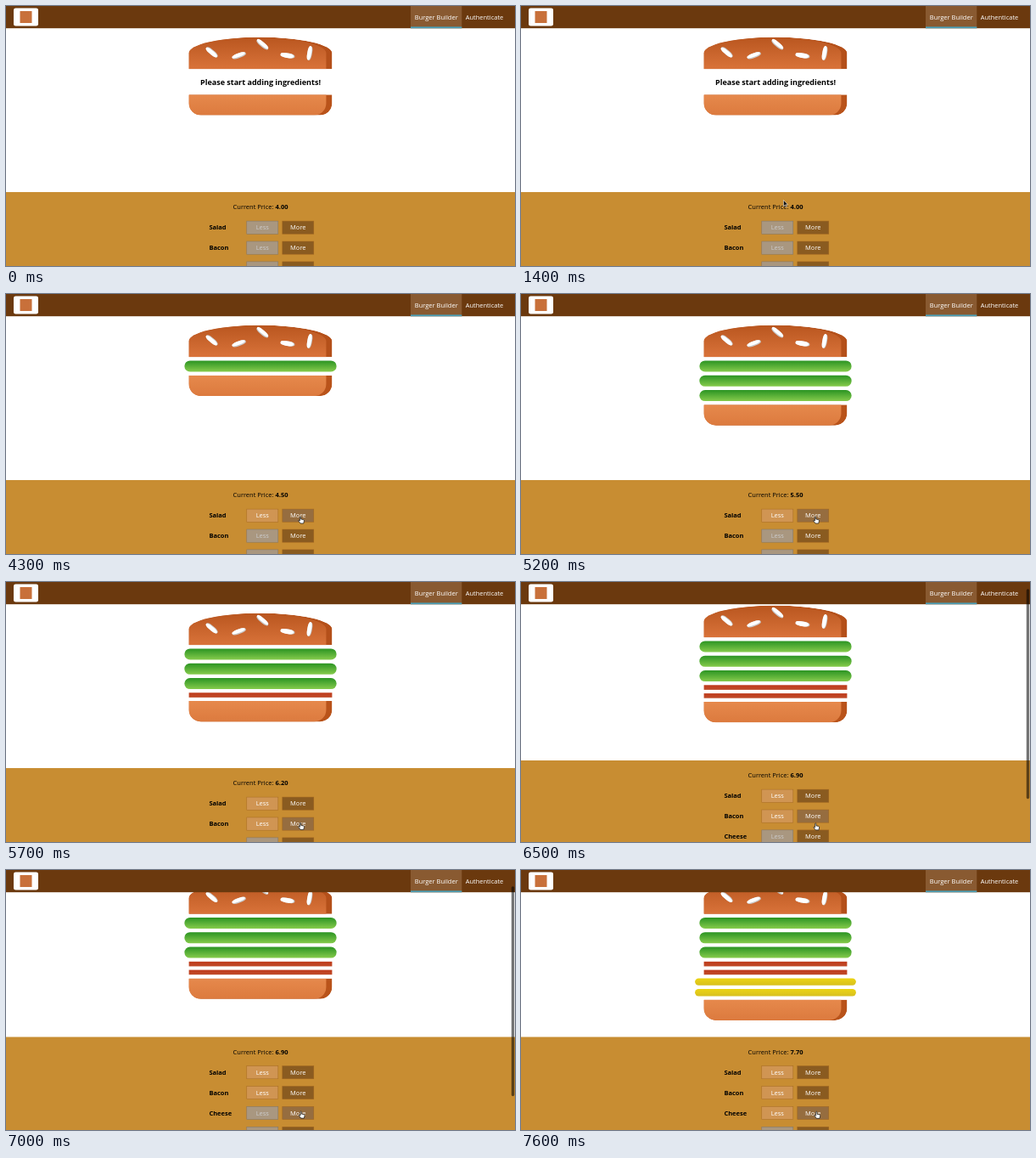
Animation, 600 px wide and 306 px high, one loop 8 s. Source, as an HTML page:

```html
<!DOCTYPE html>
<html lang="en">
<head>
<meta charset="utf-8">
<title>Burger Builder</title>
<style>
  html, body { margin: 0; width: 100%; height: 100%; overflow: hidden; background: #fff; }
  svg { display: block; width: 100%; height: 100%; }
  text { font: 7.5px "Open Sans", "Noto Sans", sans-serif; fill: #000; white-space: pre; }
  .bold { font-weight: 700; }
  .mid { text-anchor: middle; }
  .light { fill: #fff; }
</style>
</head>
<body>
<svg id="stage" viewBox="0 0 600 306" preserveAspectRatio="none">
  <defs>
    <linearGradient id="topFill" x2="0" y2="1"><stop stop-color="#b9561f"/><stop offset="1" stop-color="#d9733a"/></linearGradient>
    <linearGradient id="baseFill" x2="0" y2="1"><stop stop-color="#e6894c"/><stop offset="1" stop-color="#dc7a3e"/></linearGradient>
    <linearGradient id="saladFill" x2="0" y2="1"><stop stop-color="#2b9423"/><stop offset="1" stop-color="#86cb4c"/></linearGradient>
    <linearGradient id="baconFill" x2="0" y2="1"><stop stop-color="#bf3a1a"/><stop offset="1" stop-color="#c04c2a"/></linearGradient>
    <linearGradient id="cheeseFill" x2="0" y2="1"><stop stop-color="#ecd412"/><stop offset="1" stop-color="#d8c020"/></linearGradient>
    <path id="topShape" d="M215.6 74.2V55.45A84.4 18.75 0 0 1 384.4 55.45V74.2Z"/>
    <path id="baseShape" d="M215.6 0H384.4V10.3A14.1 14.1 0 0 1 370.3 24.4H229.7A14.1 14.1 0 0 1 215.6 10.3Z"/>
    <clipPath id="topClip"><use href="#topShape"/></clipPath>
    <clipPath id="baseClip"><use href="#baseShape"/></clipPath>
  </defs>

  <rect width="600" height="306" fill="#fff"/>

  <g id="page">
    <g clip-path="url(#topClip)">
      <use href="#topShape" fill="#b4501a"/>
      <use href="#topShape" fill="url(#topFill)" x="-7"/>
    </g>
    <g id="seeds"></g>
    <text id="hint" class="bold mid" x="300" y="92.8" style="font-size:9px">Please start adding ingredients!</text>
    <g id="layers"></g>
    <g id="base">
      <g clip-path="url(#baseClip)">
        <use href="#baseShape" fill="#b9531a"/>
        <use href="#baseShape" fill="url(#baseFill)" x="-7"/>
      </g>
    </g>
    <rect y="219" width="600" height="170" fill="#c88d32"/>
    <text class="mid" x="300" y="239.2">Current Price: <tspan id="price" class="bold">4.00</tspan></text>
    <g id="rows"></g>
  </g>

  <rect width="600" height="26.2" fill="#6b390e"/>
  <rect x="9" y="2.4" width="29" height="21.2" rx="2.4" fill="#fff"/>
  <rect x="16.5" y="6" width="14" height="14" fill="#c8703a"/>
  <rect x="477" width="60.3" height="26.2" fill="#895a31"/>
  <rect x="477" y="24.4" width="60.3" height="1.8" fill="#4a9fb8"/>
  <text class="light" x="481.8" y="15.7">Burger Builder</text>
  <text class="light" x="541.7" y="15.7">Authenticate</text>

  <rect id="thumb" x="595.8" width="3.4" height="247" rx="1.7" fill="#000"/>

  <g id="cursor">
    <g id="arrow">
      <path d="M0 0V7.2L1.7 5.6L2.8 8.1L3.9 7.6L2.8 5.2H5Z" fill="#111" stroke="#fff" stroke-width=".5"/>
      <g id="ban" transform="translate(4.3 9)">
        <circle r="3.2" fill="#fff" stroke="#fff" stroke-width="2"/>
        <path d="M-2.1 -2.1L2.1 2.1M3 0A3 3 0 1 1 -3 0A3 3 0 1 1 3 0Z" fill="none" stroke="#333" stroke-width="1"/>
      </g>
    </g>
    <path id="hand" d="M-.6 .5Q0 -.5 .7 .5V3L3.6 3.6Q4.6 3.9 4.4 5L3.8 8H0L-2.2 5Q-2.4 3.9 -1.4 4.2L-.6 5Z" fill="#fff" stroke="#111" stroke-width=".7" stroke-linejoin="round"/>
  </g>
</svg>

<script>
const LOOP = 8000, STEP = 100, GAP = 4.2, STACK_TOP = 78.4;
const kinds = {
  salad:  { label: 'Salad',  cost: .5, w: 179.3, h: 13.1, r: 6.55 },
  bacon:  { label: 'Bacon',  cost: .7, w: 168.8, h: 5.6,  r: 0 },
  cheese: { label: 'Cheese', cost: .4, w: 189.8, h: 8.4,  r: 4.2 },
  meat:   { label: 'Meat',   cost: 1.3 }
};
const clicks = [
  [3900, 'salad'], [4800, 'salad'], [5200, 'salad'],
  [5700, 'bacon'], [6100, 'bacon'],
  [7200, 'cheese'], [7600, 'cheese']
];
const hovers = [[3600, 'salad'], [5400, 'bacon'], [7000, 'cheese']];

// Tracks of [time, value, ...], linear between keys
const scrollKeys = [[6300, 0], [6400, 3], [6500, 9], [6600, 15], [6700, 19.5], [6800, 21.2], [7000, 22.5]];
const thumbKeys = [[6300, 0], [6400, .55], [7300, .55], [7600, 0]];
const cursorKeys = [
  [500, 372, 306], [800, 340, 262], [1100, 314, 224], [1300, 309.5, 228], [1400, 309.5, 228.5],
  [1600, 311, 244], [1900, 311, 244], [2400, 301, 257], [2800, 297.3, 261.3],
  [3200, 297.3, 261.3], [3700, 347, 262], [5200, 347, 262], [5500, 347, 283.3],
  [6700, 347.3, 284], [7600, 348.3, 284.3]
];

const $ = id => document.getElementById(id);

function add(parent, tag, attrs, text = '') {
  const el = document.createElementNS('http://www.w3.org/2000/svg', tag);
  for (const k in attrs) el.setAttribute(k, attrs[k]);
  el.textContent = text;
  return parent.appendChild(el);
}

function sample(keys, t) {
  if (t <= keys[0][0]) return keys[0].slice(1);
  for (let i = 1; i < keys.length; i++) {
    const [a, b] = [keys[i - 1], keys[i]];
    if (t <= b[0]) {
      const p = (t - a[0]) / (b[0] - a[0]);
      return a.slice(1).map((v, j) => v + (b[j + 1] - v) * p);
    }
  }
  return keys[keys.length - 1].slice(1);
}

// Seed: centre, turn, inner shade offset
[[274.7, 58.3, -20, -.9, -1.4], [242.7, 54.4, 40, -.5, .9], [302.3, 45.3, 40, -.5, -1.4],
 [332, 58.3, 10, -1.4, 0], [358, 55.6, 100, -.5, .9]].forEach(([x, y, turn, dx, dy]) => {
  const g = add($('seeds'), 'g', { transform: `translate(${x} ${y}) rotate(${turn})` });
  const pill = (w, h, cx, cy, fill) =>
    add(g, 'rect', { x: cx - w / 2, y: cy - h / 2, width: w, height: h, rx: w * .4, ry: h * .4, fill });
  pill(16.9, 5.6, 0, 0, '#c9c9c9');
  pill(16.9 - Math.abs(dx), 5.6 - Math.abs(dy), dx / 2, dy / 2, '#fff');
});

const layers = clicks.map(([at, kind]) => {
  const { w, h, r } = kinds[kind];
  const el = add($('layers'), 'rect', { x: 300 - w / 2, width: w, height: h, rx: r, fill: `url(#${kind}Fill)` });
  return { at, kind, el };
});

function button(x, y, label) {
  const box = add($('rows'), 'rect', { x, y, width: 37, height: 15.2, 'stroke-width': .5 });
  const text = add($('rows'), 'text', { x: x + 18.5, y: y + 10.3, class: 'mid' }, label);
  return (fill, stroke, color) => {
    box.setAttribute('fill', fill);
    box.setAttribute('stroke', stroke);
    text.style.fill = color;
  };
}

const rows = Object.keys(kinds).map((kind, i) => {
  const y = 253.1 + i * 23.9;
  add($('rows'), 'text', { x: 239.4, y: y + 10.3, class: 'bold' }, kinds[kind].label);
  return { kind, less: button(283.8, y, 'Less'), more: button(325.8, y, 'More') };
});

const show = (el, on) => el.setAttribute('visibility', on ? 'visible' : 'hidden');
const move = (el, x, y) => el.setAttribute('transform', `translate(${x} ${y})`);

function render(t) {
  const count = { salad: 0, bacon: 0, cheese: 0, meat: 0 };
  let y = STACK_TOP, price = 4;
  for (const { at, kind, el } of layers) {
    const on = t >= at;
    show(el, on);
    if (!on) continue;
    el.setAttribute('y', y);
    y += kinds[kind].h + GAP;
    price += kinds[kind].cost;
    count[kind]++;
  }
  const empty = y === STACK_TOP;
  show($('hint'), empty);
  move($('base'), 0, empty ? 104.2 : y);
  $('price').textContent = price.toFixed(2);

  const hover = hovers.filter(h => t >= h[0]).pop();
  for (const { kind, less, more } of rows) {
    if (count[kind]) less('#d09553', '#a56a22', '#fff');
    else less('#a99780', '#7e7365', '#ccc');
    more(hover && hover[1] === kind ? '#966d3f' : '#8a5b20', '#a0651f', '#fff');
  }

  const [scroll] = sample(scrollKeys, t);
  move($('page'), 0, -scroll);
  $('thumb').setAttribute('y', scroll * .807 + 1);
  $('thumb').setAttribute('opacity', sample(thumbKeys, t)[0]);

  const [cx, cy] = sample(cursorKeys, t);
  const inLess = cx > 283 && cx < 321 && cy > 253 && cy < 268.5;
  move($('cursor'), cx, cy);
  show($('arrow'), t >= 600 && !hover);
  show($('ban'), t >= 600 && !hover && inLess);
  show($('hand'), !!hover);
}

function tick() {
  const t = performance.now() % LOOP;
  render(Math.floor(t / STEP) * STEP);
  requestAnimationFrame(tick);
}
tick();
</script>
</body>
</html>
```
